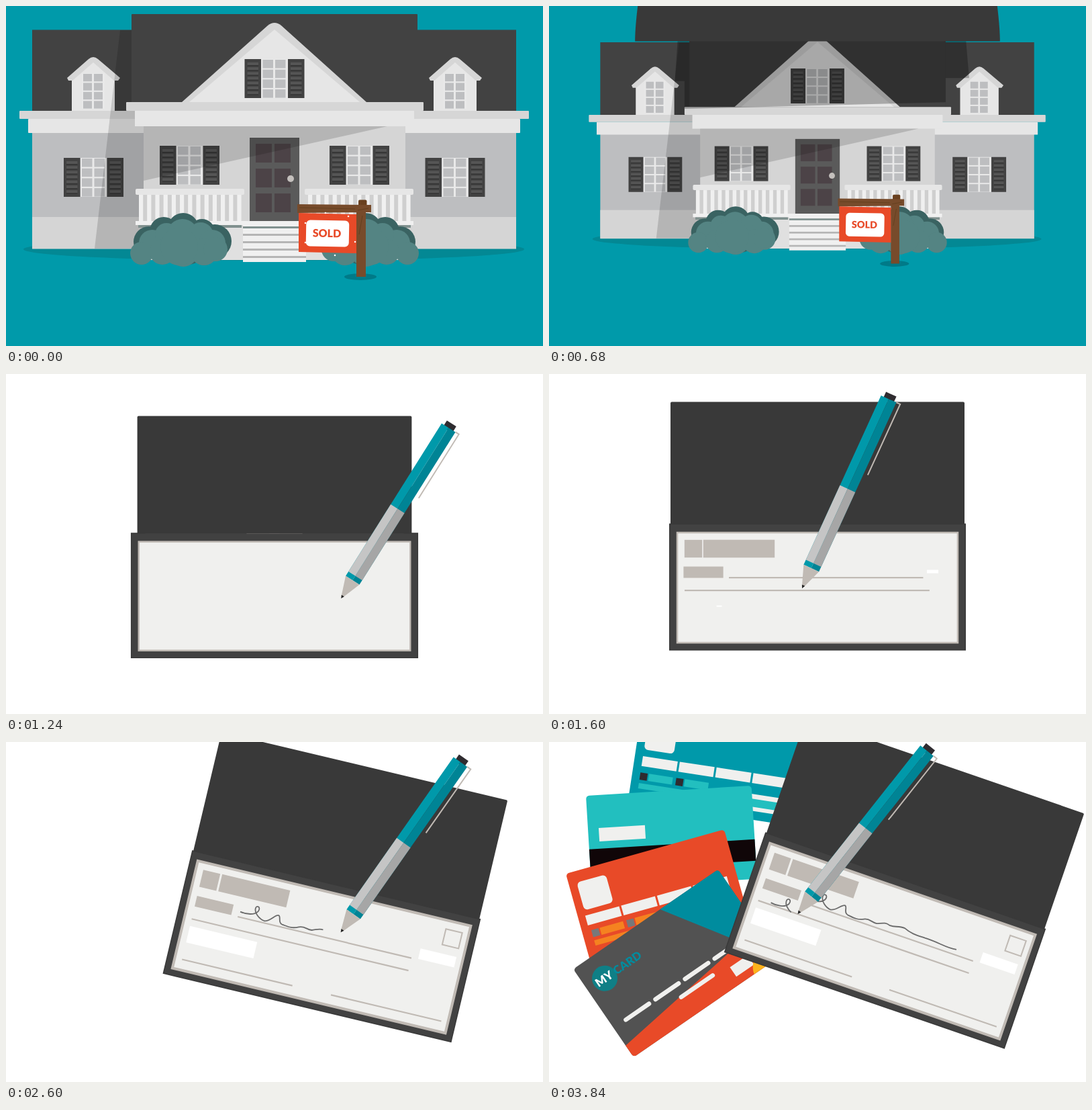
Write an HTML page that moves like this. It is 800x506 px and loops after 3.88 s.

```html
<!DOCTYPE html>
<html lang="en">
<head>
<meta charset="utf-8">
<title>Home to cards</title>
<style>
html, body { margin: 0; width: 100%; height: 100%; overflow: hidden; background: #009aaa; }
svg { display: block; width: 100vw; height: 100vh; }
text { font-family: Lato, sans-serif; font-weight: 900; }
</style>
</head>
<body>
<svg id="stage" viewBox="0 0 800 506"></svg>
<script>
const LOOP = 3880;
const GREY = '#c0bab4', PAPER = '#f0f0ee', TEAL = '#0099aa', AQUA = '#22bfbf', RED = '#e84a28', ORANGE = '#f58220';

// ---------- markup helpers ----------
const rect = (x, y, w, h, fill, r = 0, more = '') => `<rect x="${x}" y="${y}" width="${w}" height="${h}" rx="${r}" fill="${fill}" ${more}/>`;
const circle = (x, y, r, fill) => `<circle cx="${x}" cy="${y}" r="${r}" fill="${fill}"/>`;
const shape = (d, fill, more = '') => `<path d="${d}" fill="${fill}" ${more}/>`;
const line = (d, color, w, more = '') => `<path d="${d}" fill="none" stroke="${color}" stroke-width="${w}" ${more}/>`;
const group = (id, body, more = '') => `<g id="${id}" ${more}>${body}</g>`;
const range = (n, fn) => Array.from({ length: n }, (_, i) => fn(i)).join('');

// ---------- house ----------
function panes(x, y, w, h) {
  const pw = (w - 8) / 2, ph = (h - 8) / 4;
  return rect(x, y, w, h, '#e9e9e9') +
    range(8, i => rect(x + 2 + (i % 2) * (pw + 3), y + 1 + (i >> 1) * (ph + 2.2), pw, ph, '#bdbec0'));
}
function shutter(x, y) {
  return rect(x, y, 24.5, 58, '#424242') +
    range(7, i => rect(x + 4, y + 5 + i * 7.2, 16.5, 5, '#555') + rect(x + 4, y + 9 + i * 7.2, 16.5, 1.5, '#333'));
}
const windowAt = (x, y) => shutter(x, y) + panes(x + 25, y, 39, 58) + shutter(x + 64.5, y);
const dormer = x => shape(`M${x - 32} 156V104L${x} 80L${x + 32} 104V156z`, '#e6e6e6') +
  shape(`M${x - 39} 107L${x - 7} 79Q${x} 73 ${x + 7} 79L${x + 40} 107L${x + 37} 111H${x + 31}L${x} 84L${x - 31} 111H${x - 37}z`, '#d6d6d6') +
  panes(x - 17, 100, 34, 53);
const fence = x => rect(x + 5, 281, 152, 40, '#cfcfcf') +
  range(13, i => rect(x + 5 + i * 12.2, 281, 6.2, 40, '#f0f0f0')) +
  rect(x, 272, 162, 9, '#e6e6e6', 2) + rect(x, 320, 162, 6, '#f0f0f0') + rect(x + 4, 326, 154, 4, '#81918f');
function bush() {
  const back = [[213, 351, 23], [235, 335, 21], [264, 331, 23], [292, 336, 19], [311, 350, 25], [270, 355, 30]];
  const front = [[218, 353, 20], [239, 340, 17], [263, 340, 23], [290, 341, 19], [307, 353, 20], [202, 368, 17],
    [233, 366, 19], [264, 366, 22], [295, 366, 20], [312, 362, 18], [258, 358, 28]];
  return back.map(c => circle(...c, '#3a6362')).join('') + front.map(c => circle(...c, '#548483')).join('');
}
const sign = `<ellipse cx="528" cy="403" rx="24" ry="5" fill="#007a88"/>` +
  rect(522, 296, 14, 107, '#774b2b') + rect(525, 288.5, 12.5, 12, '#69401f', 2) +
  shape('M434 295L544 296V307L434 308z', '#774b2b') + line('M437 300L520 302M524 304L540 301M531 312L526 340', '#63401f', 1) +
  shape('M436 308L522 310V368L436 366z', RED) +
  `<g transform="rotate(1 479 339)">${rect(447, 319, 64, 39, '#fff', 6)}<text x="478" y="344" font-size="16" text-anchor="middle" fill="${RED}">SOLD</text></g>`;
const house =
  `<ellipse cx="399" cy="362" rx="373" ry="17" fill="#038894"/>` +
  rect(39, 35.5, 721, 122, '#424242') + rect(39, 188, 721, 173, '#bdbec0') + rect(39, 314, 721, 47.5, '#d5d5d5') +
  dormer(130) + dormer(669) +
  rect(20, 156, 759, 12, '#d6d6d6', 1) + rect(33, 168, 733, 21, '#e6e6e6', 1) +
  windowAt(86, 226) + windowAt(624.5, 226) +
  shape('M170 36H230V361H132z', '#000', 'opacity=".15"') +
  rect(187, 12, 426, 132, '#424242', 1) + rect(205, 178, 390, 150, '#d5d5d5') +
  rect(205, 329, 390, 49, '#e0e0e0') +
  shape('M262 143L390 29Q400 21 410 29L537 143z', '#d6d6d6') + shape('M273 143L400 35L527 143z', '#e6e6e6') +
  windowAt(355.5, 79) +
  rect(179, 143, 443, 13, '#d6d6d6', 1) + rect(192, 156, 416, 23, '#e6e6e6') +
  windowAt(229, 208) + windowAt(482, 208) +
  rect(363, 196, 74, 125, '#5a5a5a') +
  range(6, i => rect(372 + (i % 2) * 28, 205 + (i >> 1) * 37, 24, 28, '#4c4347')) + circle(424, 257, 5, '#c4c0bd') +
  shape('M205 179H568L205 260z', '#000', 'opacity=".15"') +
  rect(353, 320, 94, 61, '#f0f0f0') + range(5, i => rect(353, 328 + i * 11, 94, 3, i ? '#b5b5b5' : '#81918f')) +
  fence(193) + fence(445) + bush() + `<g transform="matrix(-1 0 0 1 800 0)">${bush()}</g>` +
  shape('M169 12H645L652 95H613V135L179 146V100H163z', '#000', 'id="shade"') + sign;

// ---------- wallet ----------
const SIG = 'M-130 -22C-120 -20-108 -22-104 -29C-101 -36-109 -38-109 -32C-109 -25-100 -18-92 -17C-83 -18-78 -31-73 -30C-69 -29-72 -19-65 -18C-56 -17-50 -15-40 -20C-32 -24-28 -19-20 -20C-12 -23-8 -26-2 -24C6 -22 12 -28 22 -27C34 -22 44 -23 55 -23C75 -24 90 -19 105 -22';
// x, y, width, height, colour, start time, grow from the left edge
const parts = [
  [-198, -70, 26, 26, GREY, 1330], [-169, -70, 104, 26, GREY, 1340], [-198, -30, 56, 16, GREY, 1370],
  [-132, -15, 266, 2.2, GREY, 1400, 1], [-198, 4, 332, 2.2, GREY, 1420, 1],
  [144, -31, 55, 16, '#fff', 1579], [-198, 16, 103, 25, '#fff', 1596],
  [-198, 66, 169, 2.2, GREY, 1690, 1], [30, 66, 169, 2.2, GREY, 1730, 1]
];
const wallet =
  group('lid', rect(-219, -275.5, 438, 183, '#393939', 2)) +
  shape('', '#393939', 'id="body"') + rect(-219.5, -93, 439, 186, '#424242', 2, 'id="inside"') +
  group('check', rect(-209, -81, 418, 164, PAPER, 0, `id="paper" stroke="${GREY}"`) +
    parts.map((p, i) => group('part' + i, rect(...p.slice(0, 5)))).join('') +
    group('part9', rect(174, -68, 25, 24, 'none', 0, `stroke="${GREY}" stroke-width="2"`)) +
    line(SIG, '#6b6b6b', 1.8, 'id="sig"') + line(SIG, '#6b6b6b', 1.8, 'id="sig2" transform="translate(-49 24)"')) +
  group('front', rect(-199, -93.5, 398, 170.5, '#424242') + rect(-43, -26, 86, 35, GREY) + rect(-8, -12, 16, 6, PAPER));

// ---------- pen, tip at the origin, pointing down ----------
const pen =
  rect(-8, -318, 17, 12, '#2f2c30', 0, 'id="cap"') +
  rect(-12.5, -310, 12.5, 277, TEAL) + rect(0, -310, 12.5, 277, '#008495') +
  group('grip', rect(-12.5, -122, 12.5, 122, '#c5c5c5') + rect(0, -122, 12.5, 122, '#a6a6a6')) +
  shape('M-12.5 -33H12.5L1.5 -3H-1.5z', GREY) + shape('M-2.4 -5H2.4L0 0z', '#222') +
  line('', GREY, 2, 'id="clip"');

// ---------- cards ----------
const blocks = (x, y) => range(4, i => rect(x + i * 55.5, y, 52.5, 15, PAPER));
const small = (x, y, dark, tint) => rect(x, y, 11, 11, dark) + rect(x + 13, y, 36, 11, tint) +
  rect(x + 54, y, 11, 11, dark) + rect(x + 67, y, 36, 11, tint) + rect(x, y + 16, 75, 8, tint);
const dashes = [[22, 106.5, 42], [75.5, 106.5, 42], [129, 106.5, 42], [182.5, 106.5, 42], [109, 125.5, 57]];
const faces = [
  rect(-12, -91, 247, 160, TEAL, 5) + rect(0, -53, 45, 43, PAPER, 6) + blocks(0, 0) + small(0, 24.5, '#2f2c30', AQUA) +
    rect(168, 31, 51, 25, PAPER) + rect(168, 38, 44, 12, AQUA),
  rect(0, 0, 247, 139, AQUA, 5) + rect(0, 80, 247, 32, '#100608') + rect(16, 49, 69, 20, PAPER),
  rect(0, 0, 245, 160, RED, 5) + rect(12, 17, 45, 43, PAPER, 6) + blocks(11, 68) + small(14, 91, '#77787a', ORANGE),
  rect(0, 0, 262, 159, '#525252', 5) + shape('M157 0H257Q262 0 262 5V159z', '#008c9e') +
    shape('M0 138L262 104V154Q262 159 257 159H5Q0 159 0 154z', RED) +
    group('badge', rect(194, 130, 32, 17, PAPER) + shape('M218 159Q222 143 238 138L258 159z', '#fdb31c')) +
    circle(31, 38, 19, '#0f7f86') +
    `<text x="16" y="44" font-size="17" fill="#fff">MY</text><text x="48" y="44" font-size="17" fill="#008c9e">CARD</text>` +
    dashes.map((_, i) => line('', PAPER, 6.5, `id="dash${i}" stroke-linecap="round"`)).join('')
];
// x, y, angle at the first rest and at the final rest
const rests = [
  [[112, 13, 8.7], [140, 21, 8.7]],
  [[43, 80, -3.7], [55, 80, -3.5]],
  [[27, 197, -15.6], [25, 196, -15.6]],
  [[52, 336, -36.2], [36, 338, -34.5]]
];
const drift = [[-20, -14], [-22, 0], [-24, 8], [-30, 28]];

stage.innerHTML = rect(0, 0, 800, 506, '#009aaa') + `<circle id="disc" cx="400" cy="214" fill="#fff"/>` +
  group('house', house) + group('dots', '') + faces.map((f, i) => group('card' + i, f)).join('') +
  group('wallet', wallet) + group('rays', '') + group('pen', pen);

// ---------- motion ----------
const $ = id => document.getElementById(id);
const set = (id, name, value) => $(id).setAttribute(name, value);
const move = (id, value) => set(id, 'transform', value);
const show = (id, on) => set(id, 'visibility', on ? 'visible' : 'hidden');
const part = (t, a, b) => Math.min(1, Math.max(0, (t - a) / (b - a)));
const smooth = x => x * x * (3 - 2 * x);
const cubic = x => x < .5 ? 4 * x ** 3 : 1 - 4 * (1 - x) ** 3;
const back = x => x <= 0 ? 0 : 1 + 2.7 * (x - 1) ** 3 + 1.7 * (x - 1) ** 2;
const mix = (a, b, x) => a + (b - a) * x;

function keys(t, list) {
  let i = 0;
  while (i < list.length - 2 && t > list[i + 1][0]) i++;
  const [a, b] = [list[i], list[i + 1]], x = smooth(part(t, a[0], b[0]));
  return a.slice(1).map((v, n) => mix(v, b[n + 1], x));
}

const sigLen = $('sig').getTotalLength();
const write1 = t => part(t, 2250, 2750);
const write2 = t => part(t, 3640, 4420);
function ink(id, p) {
  set(id, 'stroke-dasharray', `${p * sigLen} ${sigLen + 9}`);
  show(id, p > 0);
}

function walletPose(t) {
  const fall = part(t, 540, 949), drop = 1 - part(t, 680, 949), grow = smooth(part(t, 1040, 1380)), turn = cubic(part(t, 2280, 2833));
  const big = t < 949 ? 1 + .347 * drop : 1;
  const sx = mix(.914, 1, grow) * big, sy = mix(.968, 1, grow) * big;
  const y = mix(443 * fall * fall - 91.5 * big, 317, grow);
  // turns about a point high on the lid, which itself slides right
  const a = 19 * turn, r = a * Math.PI / 180, arm = 200;
  return {
    x: mix(400, 565.6, turn) - arm * Math.sin(r),
    y: y - arm - 10.6 * turn + arm * Math.cos(r),
    a, sx, sy, grow, drop
  };
}

function drawHouse(t) {
  const s = 1 - .001025 * Math.max(0, t - 580);
  show('house', t < 1150);
  move('house', `translate(400 214) scale(${s}) translate(-400 -214)`);
  set('disc', 'r', Math.max(0, (t - 690) * 361 / 310));
  const k = part(t, 540, 680);
  set('shade', 'opacity', .27 * k);
  move('shade', `translate(0 12) scale(1 ${k}) translate(0 -12)`);
  const out = 1 + t / 900;
  $('dots').innerHTML = t < 240 ? [[-33, -16], [-3, -31], [31, -26], [-33, 13], [41, 12], [11, 32]]
    .map(([x, y]) => circle(479 + x * out, 339 + y * out, 1.3 * (1 - t / 240), '#fff')).join('') : '';
}

function drawWallet(t, w) {
  show('wallet', t > 540);
  move('wallet', `translate(${w.x} ${w.y}) rotate(${w.a}) scale(${w.sx} ${w.sy})`);
  const b = 30 * w.drop;
  set('body', 'd', `M-221 94.5Q-221 50 ${b - 221} -94.5H${221 - b}Q221 50 221 94.5z`);
  move('lid', `translate(0 -95) scale(${mix(.9, 1, w.grow)} ${mix(.92, 1, w.grow)}) translate(0 95)`);
  const open = smooth(part(t, 1050, 1250));
  set('inside', 'opacity', open);
  set('front', 'opacity', part(t, 760, 940));
  move('front', `translate(0 -93.5) scale(1 ${1 - open}) translate(0 93.5)`);
  show('front', t > 760 && open < 1);
  set('check', 'opacity', t > 1050 ? 1 : 0);
  move('check', `scale(${mix(.86, 1, open)})`);
  set('paper', 'stroke-width', mix(2.5, 4, part(t, 1680, 1800)));
  parts.concat([[174, -68, 25, 24, '', 1660]]).forEach(([x, y, pw, ph, , at, left], i) => {
    const s = back(part(t, at, at + 300)), cx = left ? x : x + pw / 2, cy = y + ph / 2;
    move('part' + i, `translate(${cx} ${cy}) scale(${s} ${left ? 1 : s}) translate(${-cx} ${-cy})`);
    show('part' + i, s > 0);
  });
  ink('sig', write1(t - 50 * (1 - part(t, 2750, 2800))));
  ink('sig2', write2(t - 32));
}

function drawRays(t) {
  const p = part(t, 920, 1240), a = 8 + 45 * p, b = 19 + 46 * Math.sqrt(p) * .8;
  let out = '';
  if (p > 0 && p < 1) for (let i = 0; i < 11; i++) {
    const q = i * Math.PI * 2 / 11 - Math.PI / 2, c = Math.cos(q), s = Math.sin(q);
    const far = b - (i % 3) * 3, near = Math.min(a, far);
    const d = `M${214 + c * near} ${430 + s * near}L${214 + c * far} ${430 + s * far}`;
    out += line(d, TEAL, 1.8) + line(d, '#fff', 1.2, 'transform="translate(-.8 -.6)"');
  }
  $('rays').innerHTML = out;
}

function drawPen(t, w) {
  let [x, y] = keys(t, [[800, 418, -20], [1000, 439, 394], [1080, 440, 390], [1300, 512, 322], [1600, 377, 319],
    [2250, 270, 295], [2750, 607, 309], [3160, 414, 262], [3640, 331, 237], [3880, 374, 259]]);
  const [angle] = keys(t, [[800, -9], [1000, -5.2], [1080, -4], [1300, 40], [1600, 24.6], [2250, 21],
    [2600, 35.1], [2780, 44], [3160, 52.8], [3640, 36], [3840, 38.4]]);
  const second = t >= 3640;
  if (second || (t >= 2250 && t <= 2750)) {
    const p = $('sig').getPointAtLength((second ? write2(t) : write1(t)) * sigLen);
    const px = p.x - (second ? 49 : 0), py = p.y + (second ? 24 : 0), r = w.a * Math.PI / 180;
    x = w.x + px * Math.cos(r) - py * Math.sin(r);
    y = w.y + px * Math.sin(r) + py * Math.cos(r);
  }
  const g = part(t, 920, 1080);
  show('pen', t > 800);
  move('pen', `translate(${x} ${y}) rotate(${angle}) scale(${mix(.914, 1, smooth(part(t, 1040, 1380)))})`);
  move('grip', `translate(${-3 * (1 - g)} ${mix(-38, -41, part(g, .5, 1))}) scale(${mix(.3, 1, g)} ${g})`);
  set('cap', 'y', mix(-308, -318, part(g, .6, 1)));
  set('clip', 'd', `M12.5 -310H${mix(10, 18.8, g)}V${-310 + 116 * g}`);
}

function drawCards(t) {
  rests.forEach(([a, b], i) => {
    const at = 2630 + (3 - i) * 15, [dx, dy] = drift[i];
    const [x, y, r, s] = keys(t, [[at, 410, 190, a[2] + 20, .35], [at + 260, a[0] + dx, a[1] + dy, a[2] - 3, 1],
      [3160, ...a, 1], [3520, ...b, 1]]);
    show('card' + i, t > at);
    move('card' + i, `translate(${x} ${y}) rotate(${r}) scale(${s})`);
  });
  dashes.forEach(([x, y, len], i) => {
    const p = part(t, 3040 + i * 55, 3215 + i * 55);
    set('dash' + i, 'd', p > 0 ? `M${x} ${y}h${Math.max(.1, len * p)}` : '');
  });
  set('badge', 'opacity', part(t, 3240, 3400));
}

function draw(t) {
  const w = walletPose(t);
  drawHouse(t);
  drawWallet(t, w);
  drawRays(t);
  drawPen(t, w);
  drawCards(t);
}

function tick() {
  draw(performance.now() % LOOP);
  requestAnimationFrame(tick);
}
tick();
</script>
</body>
</html>
```
